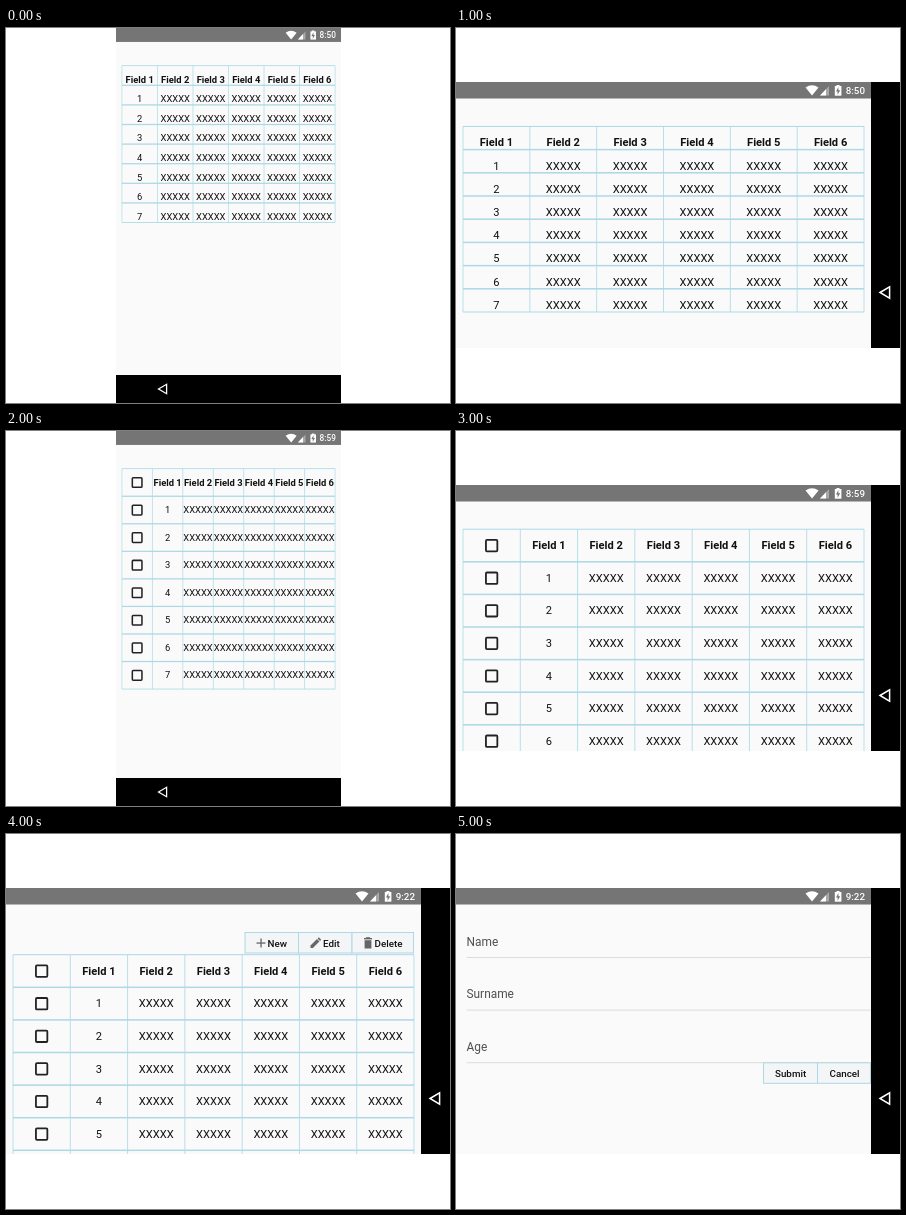
Recreate the animation shown at these times as an HTML page with a canvas. Size 444 by 375 pixels, loop 6 s.

```html
<!DOCTYPE html>
<html lang="en">
<head>
<meta charset="utf-8">
<title>Rotating table demo</title>
<style>
  html, body { margin: 0; width: 100%; height: 100%; overflow: hidden; background: #fff; }
  canvas { display: block; }
</style>
</head>
<body>
<canvas id="stage" width="444" height="375"></canvas>
<script>
const ctx = document.getElementById('stage').getContext('2d');
const PORTRAIT_SCALE = 0.845;
const BORDER = '#add8e6', INK = '#111', GRAY = '#666';

// Both orientations share one unit: a pixel of the landscape screen.
const portrait = { x: 110, y: 0, scale: PORTRAIT_SCALE, width: 225 / PORTRAIT_SCALE, height: 375 / PORTRAIT_SCALE };
const landscape = { x: 0, y: 54, scale: 1, width: 415, height: 266 };

function rect(x, y, w, h, color) {
  ctx.fillStyle = color;
  ctx.fillRect(x, y, w, h);
}

function shape(points, color, stroked) {
  ctx.beginPath();
  points.forEach(([x, y]) => ctx.lineTo(x, y));
  ctx.closePath();
  ctx[stroked ? 'strokeStyle' : 'fillStyle'] = color;
  stroked ? ctx.stroke() : ctx.fill();
}

function text(string, x, y, size, weight = 400, align = 'left', color = INK) {
  ctx.font = `${weight} ${size}px Roboto, sans-serif`;
  ctx.textAlign = align;
  ctx.fillStyle = color;
  ctx.fillText(string, x, y);
}

function statusBar(width, time) {
  rect(0, 0, width, 16.5, '#757575');
  ctx.save();
  ctx.translate(width, 0);
  ctx.fillStyle = '#fff';
  ctx.beginPath();
  ctx.moveTo(-59, 13.5);
  ctx.lineTo(-65.5, 5.5);
  ctx.quadraticCurveTo(-59, 1, -52.5, 5.5);
  ctx.fill();
  shape([[-51, 13.5], [-42, 13.5], [-42, 4]], '#a8a8a8');
  shape([[-51, 13.5], [-45, 13.5], [-45, 7.2]], '#fff');
  rect(-34.5, 3, 3, 2, '#fff');
  rect(-36.2, 4, 6.6, 9.7, '#fff');
  shape([[-32.6, 5], [-35, 9.5], [-33.4, 9.5], [-33.4, 12.7], [-30.8, 8.2], [-32.6, 8.2]], '#757575');
  text(time, -6, 12, 9.8, 500, 'right', '#fff');
  ctx.restore();
}

function navBar(upright) {
  if (upright) rect(0, 347 / PORTRAIT_SCALE, portrait.width, 34, '#000');
  else rect(415, 0, 29, 266, '#000');
  const icon = (step, draw) => {
    ctx.save();
    if (upright) ctx.translate(133.1 + step * 77.5, 427.2);
    else ctx.translate(429.3, 133 - step * 77.5);
    draw();
    ctx.restore();
  };
  ctx.lineWidth = 1.5;
  icon(-1, () => shape([[-5.3, 0], [4.3, -5.6], [4.3, 5.6]], '#fff', true));
  icon(0, () => {
    ctx.beginPath();
    ctx.arc(0, 0, 5.7, 0, 7);
    ctx.stroke();
  });
  icon(1, () => ctx.strokeRect(-5, -5, 10, 10));
}

function checkbox(x, y) {
  ctx.lineWidth = 1.8;
  ctx.strokeStyle = '#222';
  ctx.beginPath();
  ctx.roundRect(x - 5.7, y - 5.7, 11.4, 11.4, 1);
  ctx.stroke();
}

function table(screenWidth, top, rowHeight, selectable) {
  const left = 7, width = screenWidth - 14, rows = 8;
  const columns = selectable ? 7 : 6;
  const cell = width / columns;
  for (let c = 0; c <= columns; c++)
    rect(left + c * cell - 0.5, top, 1, rows * rowHeight, '#b9dfea');
  for (let r = 0; r <= rows; r++) {
    const weight = r % rows ? 1.5 : 1;
    rect(left, top + r * rowHeight - weight / 2, width, weight, BORDER);
  }
  for (let r = 0; r < rows; r++) {
    const y = top + r * rowHeight;
    for (let c = 0; c < columns; c++) {
      const x = left + (c + 0.5) * cell;
      const field = selectable ? c : c + 1;
      if (!field) checkbox(x, y + 16.4);
      else if (!r) text('Field ' + field, x, y + 20, 11.1, 700, 'center');
      else text(field === 1 ? r : 'XXXXX', x, y + 20, 11.1, 400, 'center');
    }
  }
}

function button(left, right, top, label, labelX) {
  rect(left, top, right - left, 20.5, '#f3f5f6');
  ctx.lineWidth = 1;
  ctx.strokeStyle = BORDER;
  ctx.strokeRect(left, top, right - left, 20.5);
  text(label, labelX, top + 14.2, 9.8, 500);
}

function toolbar() {
  button(239, 292.5, 44.5, 'New', 261.5);
  button(292.5, 346, 44.5, 'Edit', 317);
  button(346, 407.5, 44.5, 'Delete', 368.5);
  rect(250.5, 54.4, 9, 1.3, GRAY);
  rect(254.4, 50.5, 1.3, 9, GRAY);
  shape([[304.5, 60], [304.5, 57.6], [311, 51.1], [313.4, 53.5], [306.9, 60]], GRAY);
  shape([[311.6, 50.5], [312.8, 49.3], [315.2, 51.7], [314, 52.9]], GRAY);
  rect(358, 50, 8, 1.4, GRAY);
  rect(360, 49.2, 4, 1.2, GRAY);
  rect(358.6, 52.2, 6.8, 8.3, GRAY);
}

function form() {
  ['Name', 'Surname', 'Age'].forEach((label, i) => {
    text(label, 10.5, 57.5 + i * 52.6, 11.9, 400, 'left', '#505050');
    rect(10.5, 69 + i * 52.6, 404.5, 1, '#dcdcdc');
  });
  button(307.5, 361.5, 174.8, 'Submit', 319);
  button(361.5, 414.5, 174.8, 'Cancel', 373.5);
}

const scenes = [
  [portrait, '8:50', w => table(w, 44.6, 23.2, false)],
  [landscape, '8:50', w => table(w, 44.4, 23.2, false)],
  [portrait, '8:59', w => table(w, 44.6, 32.6, true)],
  [landscape, '8:59', w => table(w, 44.2, 32.6, true)],
  [landscape, '9:22', w => { table(w, 66.7, 32.6, true); toolbar(); }],
  [landscape, '9:22', form],
];

function draw() {
  const [screen, time, content] = scenes[Math.floor(performance.now() / 1000) % scenes.length];
  rect(0, 0, 444, 375, '#fff');
  ctx.save();
  ctx.translate(screen.x, screen.y);
  ctx.scale(screen.scale, screen.scale);
  ctx.save();
  ctx.beginPath();
  ctx.rect(0, 0, screen.width, screen.height);
  ctx.clip();
  rect(0, 0, screen.width, screen.height, '#fafafa');
  content(screen.width);
  statusBar(screen.width, time);
  ctx.restore();
  navBar(screen === portrait);
  ctx.restore();
  requestAnimationFrame(draw);
}
draw();
</script>
</body>
</html>
```
